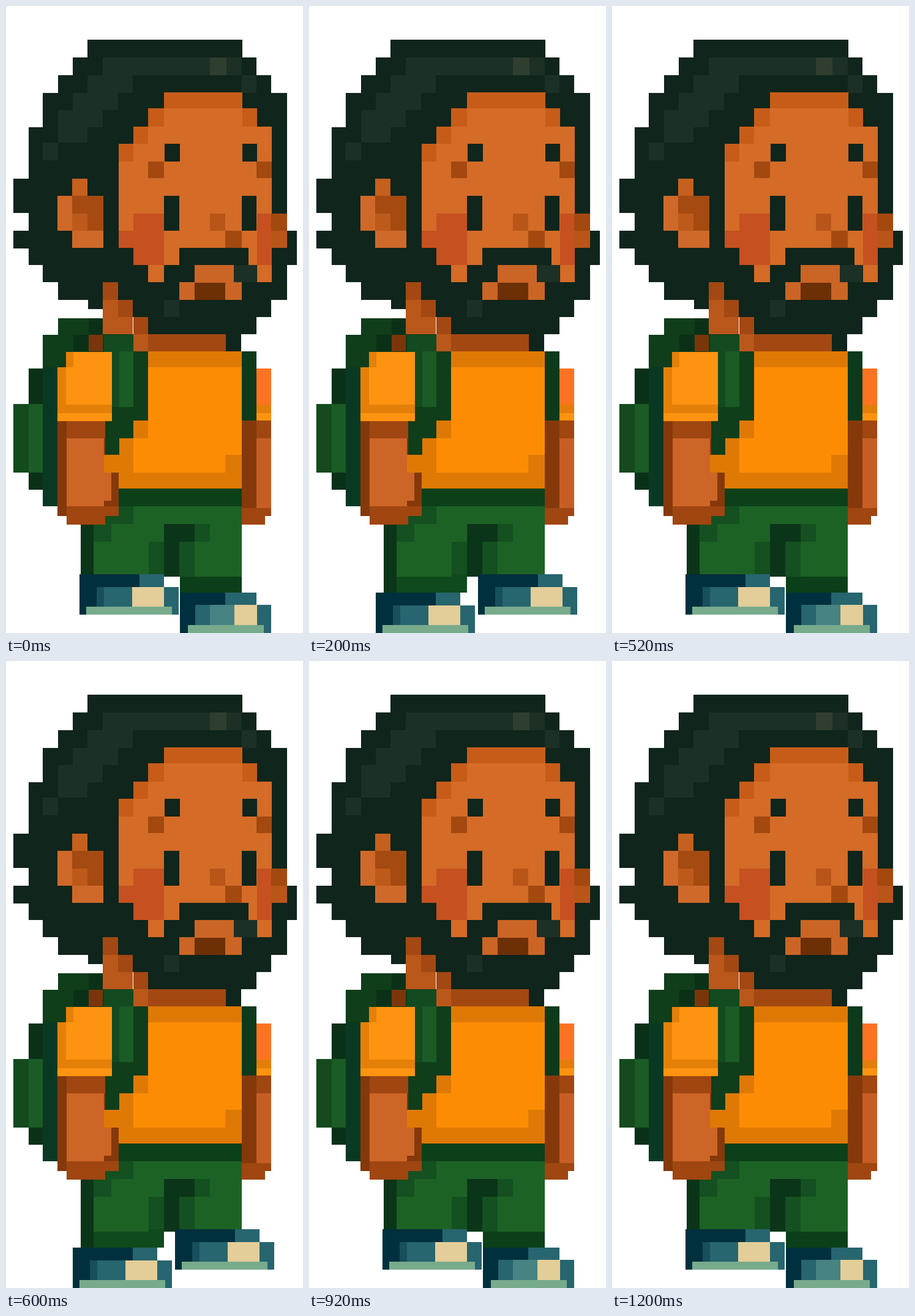
An HTML page that plays this animation: 485x1024 px, repeating every 1.4 s.

```html
<!DOCTYPE html>
<html lang="en">
<head>
<meta charset="utf-8">
<title>Walking pixel character</title>
<style>
html, body { margin: 0; width: 100%; height: 100%; overflow: hidden; background: #fff; }
svg { display: block; width: 485px; height: 1024px; }
</style>
</head>
<body>
<svg viewBox="0 0 485 1024" shape-rendering="crispEdges">
  <defs>
    <g id="shoe">
      <path fill="#00303d" d="M0 0H138V21H162V66H0Z"/>
      <path fill="#27656f" d="M98 0H138V21H162V66H151V53H28V21H98Z"/>
      <path fill="#174f5d" d="M11 53H28V21H40V53Z"/>
      <path fill="#e3cd98" d="M86 21H138V53H86Z"/>
      <path fill="#78ab8c" d="M11 53H151V66H11Z"/>
    </g>
  </defs>

  <g id="backpack">
    <path fill="#103d1a" d="M85 510H158V536H232V677H208V706H185V733H162V677H172V590H60V537H85Z"/>
    <path fill="#0a3117" d="M110 537H135V510H158V537H135V564H110ZM37 592H60V650H37ZM37 762H60V790H37Z"/>
    <path fill="#0a3923" d="M60 590H85V817H60Z"/>
    <path fill="#144a1d" d="M12 650H37V762H12Z"/>
    <path fill="#1b5b25" d="M37 650H60V762H37Z"/>
  </g>

  <g id="head">
    <path fill="#10251b" d="M133 55H386V84H409V113H433V142H459V367H475V423H459V480H433V508H409V536H384V564H359V536H232V508H207V480H183V451H158V495H134V480H85V451H60V423H37V396H12V367H37V338H12V282H37V198H60V142H85V113H109V84H133Z"/>
    <path fill="#1d3026" d="M158 84H333V113H207V142H183V170H158V198H133V223H85V252H60V223H85V170H109V142H133V113H158ZM360 84H385V113H360ZM385 113H409V142H385ZM372 423H409V451H385V480H372ZM258 480H283V508H258Z"/>
    <path fill="#303e30" d="M333 84H360V113H333Z"/>
    <path fill="#d46b27" d="M258 141H386V167H410V197H434V339H459V395H434V451H410V423H396V395H283V423H258V451H232V423H208V395H184V225H208V197H232V167H258Z"/>
    <path fill="#c75c19" d="M258 141H386V167H258ZM232 167H258V197H232ZM386 167H410V197H386ZM208 197H232V225H208ZM184 225H208V254H184Z"/>
    <path fill="#c65020" d="M208 339H258V423H208V395H184V367H208ZM410 339H434V423H410Z"/>
    <path fill="#a34910" d="M232 254H258V281H232ZM409 254H434V281H409ZM358 367H385V395H358ZM433 339H459V367H433Z"/>
    <path fill="#b95519" d="M333 339H358V367H333ZM433 367H459V395H433Z"/>
    <path fill="#10251b" d="M259 225H284V254H259ZM386 225H410V254H386ZM258 310H283V367H258ZM385 310H409V367H385Z"/>
    <path fill="#ca6525" d="M308 423H372V451H385V480H283V451H308Z"/>
    <path fill="#6d2f05" d="M308 452H358V480H308Z"/>
    <path fill="#cf692a" d="M108 310H159V395H108V367H84V310H108Z"/>
    <path fill="#c5601e" d="M108 282H133V310H108Z"/>
    <path fill="#a54a11" d="M108 310H159V367H133V339H108Z"/>
    <path fill="#bd5a1a" d="M108 339H133V367H108Z"/>
  </g>

  <g id="neck">
    <path fill="#ba571b" d="M158 480H207V536H232V564H208V536H158Z"/>
    <path fill="#a34812" d="M158 451H183V480H207V508H232V536H359V564H232V536H208V508H183V480H158Z"/>
    <path fill="#7b350a" d="M135 537H158V564H135Z"/>
  </g>

  <g id="shirt">
    <path fill="#fd8c05" d="M232 564H385V788H172V733H185V706H208V677H232Z"/>
    <path fill="#df7905" d="M232 564H385V590H232ZM208 677H232V706H208V762H358V733H385V788H160V733H185V706H208Z"/>
    <path fill="#fd9310" d="M98 565H173V678H84V590H98Z"/>
    <path fill="#e48008" d="M98 565H110V590H98V651H173V665H84V590H98Z"/>
    <path fill="#fe7322" d="M409 592H433V651H409Z"/>
    <path fill="#e47d0a" d="M409 651H433V665H409Z"/>
    <path fill="#fd9310" d="M409 665H433V678H409Z"/>
    <path fill="#0c3a1b" d="M385 564H409V677H385Z"/>
    <path fill="#1b5b25" d="M185 564H208V655H185Z"/>
    <path fill="#134a20" d="M160 537H208V564H185V655H173V565H160Z"/>
  </g>

  <g id="trousers">
    <path fill="#0c4018" d="M184 788H385V817H184Z"/>
    <path fill="#1d6225" d="M184 817H385V928H122V846H160V832H184Z"/>
    <path fill="#145020" d="M184 817H208V846H172V875H143V846H160V832H184ZM308 846H333V875H308ZM233 875H258V928H233ZM283 875H308V932H283Z"/>
    <path fill="#0b3519" d="M122 846H143V928H122ZM258 846H308V875H283V932H258Z"/>
  </g>

  <g id="arms">
    <path fill="#85390b" d="M84 678H162V733H160V762H184V833H162V847H99V833H84ZM385 677H433V833H423V847H385Z"/>
    <path fill="#9f4611" d="M99 678H162V706H99ZM99 817H184V833H162V847H99ZM409 677H433V706H409ZM385 820H433V833H423V847H385Z"/>
    <path fill="#cd6527" d="M99 706H160V762H172V808H160V817H99Z"/>
    <path fill="#c65e24" d="M409 706H433V820H409Z"/>
  </g>

  <g id="stepA">
    <path fill="#0b3f19" d="M284 932H385V958H284Z"/>
    <path fill="#1d6225" d="M308 900H385V932H308Z"/>
    <use href="#shoe" x="120" y="928"/>
    <g transform="translate(283 958)">
      <path fill="#00303d" d="M1 0H126V20H150V66H1Z"/>
      <path fill="#27656f" d="M75 0H126V20H150V66H138V53H26V20H75Z"/>
      <path fill="#468382" d="M50 20H90V53H50Z"/>
      <path fill="#e3cd98" d="M90 20H127V53H90Z"/>
      <path fill="#78ab8c" d="M14 53H138V66H14Z"/>
    </g>
  </g>

  <g id="stepB">
    <path fill="#0b3519" d="M122 928H143V958H122Z"/>
    <path fill="#1d6225" d="M143 928H233V932H143Z"/>
    <path fill="#0e4a1b" d="M143 932H233V928H258V958H143Z"/>
    <use href="#shoe" x="109" y="958"/>
    <use href="#shoe" x="276" y="928"/>
  </g>
</svg>
<script>
const LOOP = 1400, STEP = 200;
const stepA = document.getElementById('stepA');
const stepB = document.getElementById('stepB');

function draw() {
  const odd = Math.floor(performance.now() % LOOP / STEP) % 2;
  stepA.style.display = odd ? 'none' : '';
  stepB.style.display = odd ? '' : 'none';
  requestAnimationFrame(draw);
}
draw();
</script>
</body>
</html>
```
